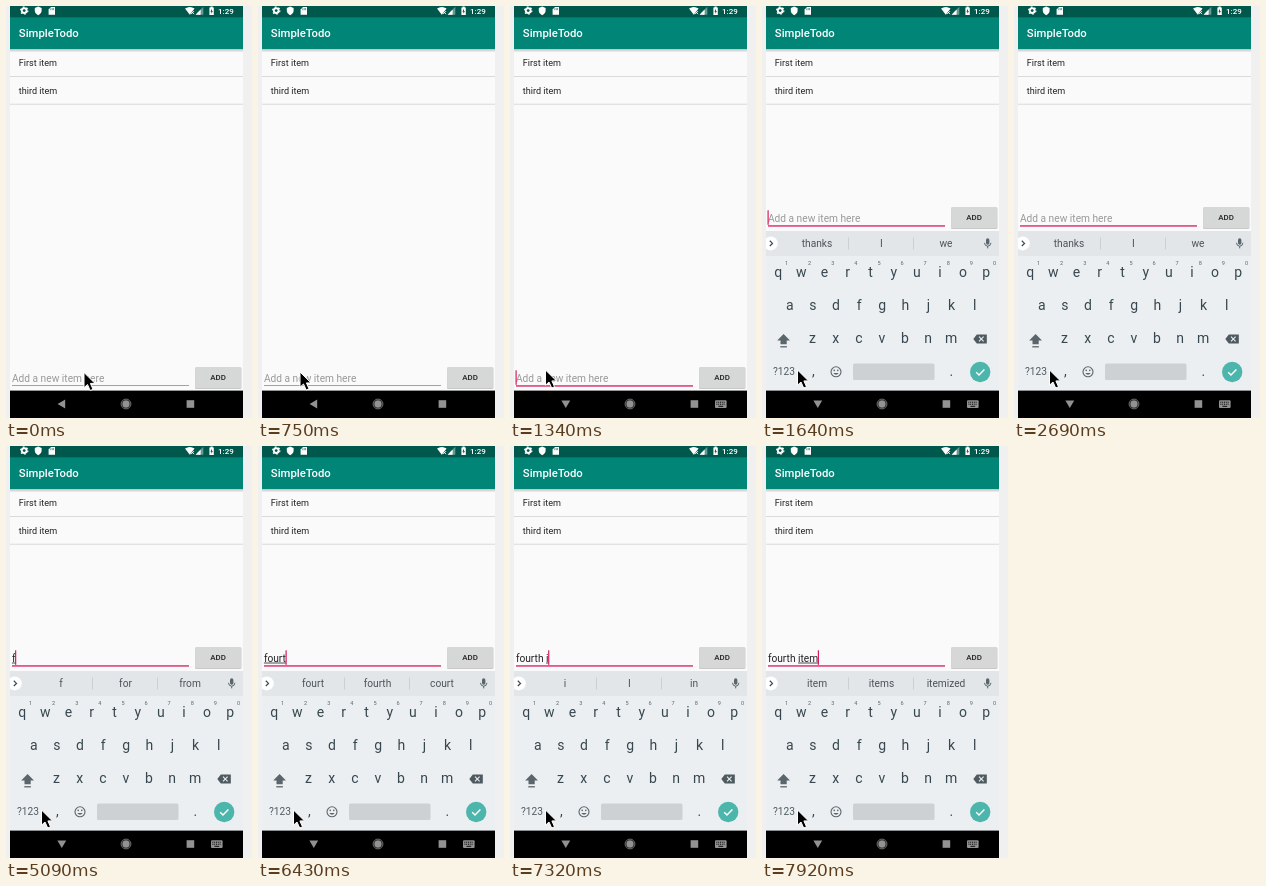
Animation of 246x412 px, one loop 8 s. Source, as an HTML page:

```html
<!DOCTYPE html>
<html lang="en">
<head>
<meta charset="utf-8">
<title>SimpleTodo</title>
<style>
  html, body { margin: 0; width: 100%; height: 100%; overflow: hidden; background: #f0f0f0; }
  svg { display: block; width: 100%; height: 100%; }
  text { font-family: Roboto, "Noto Sans", sans-serif; white-space: pre; }
  .item { font-size: 9.07px; fill: #222; }
  .field { font-size: 10.2px; fill: #222; }
  .hint { font-size: 10.2px; fill: #999; }
  .word { font-size: 10.2px; fill: #4c5359; text-anchor: middle; }
  .key { font-size: 14px; fill: #37474f; text-anchor: middle; }
  .digit { font-size: 5.6px; fill: #5b666c; text-anchor: middle; }
  .small { font-size: 10.2px; fill: #4f5b61; text-anchor: middle; }
</style>
</head>
<body>
<svg viewBox="0 0 246 412" preserveAspectRatio="none">
  <defs>
    <linearGradient id="shade" x2="0" y2="1">
      <stop offset="0" stop-color="#000" stop-opacity=".24"/>
      <stop offset="1" stop-color="#000" stop-opacity="0"/>
    </linearGradient>
    <clipPath id="screen"><rect x="4" y="0" width="233" height="385"/></clipPath>
  </defs>
  <rect width="246" height="412" fill="#f0f0f0"/>
  <rect x="4" width="233" height="412" fill="#fafafa"/>

  <!-- list -->
  <rect x="4" y="43" width="233" height="3.5" fill="url(#shade)"/>
  <path d="M4 70.5H237M4 98.2H237" stroke="#dadada"/>
  <text class="item" x="12.8" y="60">First item</text>
  <text class="item" x="12.8" y="87.8">third item</text>

  <!-- app bar and status bar -->
  <rect x="4" y="11" width="233" height="32" fill="#008577"/>
  <rect x="4" width="233" height="11.3" fill="#00574b"/>
  <text x="12.8" y="31.2" font-size="11.34" font-weight="500" fill="#fff">SimpleTodo</text>
  <g fill="#fff">
    <circle cx="18.2" cy="4.6" r="2.4" fill="none" stroke="#fff" stroke-width="1.9"/>
    <circle cx="18.2" cy="4.6" r="3.7" fill="none" stroke="#fff" stroke-width="1.1" stroke-dasharray="1.7 2.175"/>
    <path d="M32.2 .6L35.6 2V4.8Q35.4 7.8 32.2 9.2Q29 7.8 28.8 4.8V2Z"/>
    <path d="M45 1H49V8.8H42.6V3.5Z"/>
    <path d="M44.7 2.4V4.2M46.2 2V4.2M47.6 2V4.2" stroke="#00574b" stroke-width=".6"/>
    <path d="M179 2.6Q183.8 -.8 188.6 2.6L183.8 8.8Z"/>
    <path d="M185 5.1l3 3m0-3l-3 3" stroke="#fff" stroke-width=".9"/>
    <path d="M197.3 .8V8.8H189.6Z" fill-opacity=".4"/>
    <path d="M194.6 3.6V8.8H189.6Z"/>
    <path d="M203.4 1.5H204.5V.6H206.7V1.5H207.8V9H203.4Z"/>
    <path d="M206 2.7L204.4 5.7H205.4V7.8L206.9 4.9H206Z" fill="#00574b"/>
    <text x="212" y="7.7" font-size="8" font-weight="500">1:29</text>
  </g>

  <!-- entry row -->
  <g id="row">
    <rect x="6" y="379" width="177" height="1" id="rule"/>
    <text class="hint" id="hint" x="5.9" y="375.5">Add a new item here</text>
    <text class="field" id="typed" x="5.9" y="375.5"></text>
    <rect id="under" y="376.6" height=".8" fill="#222"/>
    <rect id="caret" y="364.3" width="1.2" height="14.5" fill="#d81b60"/>
    <rect x="189" y="361.8" width="46.4" height="21.2" rx="1.3" fill="#000" opacity=".2"/>
    <rect x="189.2" y="360.9" width="46" height="21" rx="1.2" fill="#d6d7d7"/>
    <text x="212" y="374.2" font-size="7.94" font-weight="500" fill="#222" text-anchor="middle">ADD</text>
  </g>

  <!-- keyboard -->
  <g clip-path="url(#screen)">
    <g id="board">
      <rect x="4" y="225" width="233" height="160" fill="#eceff1"/>
      <rect x="4" y="225" width="233" height="25" fill="#e2e6e9"/>
      <circle cx="8.8" cy="237.4" r="7" fill="#fff"/>
      <path d="M7.8 234.8L10.5 237.4L7.8 240" fill="none" stroke="#37474f" stroke-width="1.2"/>
      <path d="M86.5 231.5V243.5M151.5 231.5V243.5" stroke="#c9ced1" stroke-width=".9"/>
      <g id="words">
        <text class="word" x="55" y="241"></text>
        <text class="word" x="119.5" y="241"></text>
        <text class="word" x="184" y="241"></text>
      </g>
      <rect x="224" y="232.3" width="3.4" height="6.4" rx="1.7" fill="#5b666c"/>
      <path d="M222.5 236.8Q222.7 240.2 225.7 240.2T228.9 236.8M225.7 240.2V242.4" fill="none" stroke="#5b666c" stroke-width="1"/>
      <g id="keys"></g>
      <path d="M21.6 328L28 334.6H24.7V338.2H18.5V334.6H15.2Z" fill="#5b666c"/>
      <path d="M18.3 340.8H24.9" stroke="#5b666c" stroke-width="1.3"/>
      <path d="M211.3 333L214.8 328.4H224.8V337.6H214.8Z" fill="#4d5a60"/>
      <path d="M217 330.7l4.6 4.6m0-4.6l-4.6 4.6" stroke="#eceff1" stroke-width="1.1"/>
      <text class="small" x="22" y="369.4">?123</text>
      <text class="key" x="51.3" y="370">,</text>
      <circle cx="74" cy="365.8" r="5" fill="none" stroke="#5b666c" stroke-width="1.1"/>
      <path d="M71.3 367.1Q74 370.6 76.7 367.1Z" fill="#5b666c"/>
      <circle cx="72.2" cy="364.4" r=".8" fill="#5b666c"/>
      <circle cx="75.8" cy="364.4" r=".8" fill="#5b666c"/>
      <rect x="91" y="357.4" width="81.5" height="16.6" rx="1.5" fill="#cdd1d4"/>
      <text class="key" x="189.3" y="370">.</text>
      <circle cx="218.2" cy="366" r="10.2" fill="#4db6ac"/>
      <path d="M214.2 366.2L217 369L222.4 363.4" fill="none" stroke="#fff" stroke-width="1.4"/>
    </g>
  </g>

  <!-- navigation bar -->
  <rect x="4" y="384.6" width="233" height="27.4" fill="#000"/>
  <g fill="#929292">
    <path id="back" d="M51.6 398L59.2 393.6V402.4Z"/>
    <circle cx="120" cy="398" r="3.7"/>
    <circle cx="120" cy="398" r="4.9" fill="none" stroke="#929292" stroke-width=".8"/>
    <rect x="180.6" y="394.2" width="7.6" height="7.6"/>
    <g id="switch">
      <rect x="205" y="394.3" width="11.6" height="7.6" rx="1"/>
      <path d="M206.4 396.2H215.4M206.4 398.2H215.4" stroke="#000" stroke-width="1" stroke-dasharray="1 .8"/>
      <path d="M208.4 400.3H213.2" stroke="#000" stroke-width=".9"/>
    </g>
  </g>

  <path id="mouse" d="M0 0V15.2L3.5 12L6.2 18L9 16.8L6.4 10.9H11Z" fill="#000" stroke="#fff" stroke-width="1"/>
</svg>
<script>
  const LOOP = 8000;
  const $ = id => document.getElementById(id);
  const at = (steps, t) => steps.reduce((last, s) => s[0] <= t ? s : last);

  // [ms, x, y]
  const mouse = [[0, 78, 366.5], [300, 73, 369], [450, 63, 369.5], [600, 52, 368],
    [750, 42, 366], [890, 37, 364.5], [1040, 35.5, 364]];
  // [ms, keyboard offset]
  const slide = [[0, 160], [1490, 28], [1640, 0]];
  // [ms, caret visible]
  const blink = [[0, 0], [1040, 1], [1790, 0], [2240, 1], [2690, 0], [3290, 1],
    [3740, 0], [4190, 1], [4790, 0], [5090, 1]];
  // [ms, finished text, word being typed]
  const typing = [[0, "", ""], [5090, "", "f"], [5530, "", "fo"], [5980, "", "fou"],
    [6130, "", "four"], [6430, "", "fourt"], [6570, "", "fourth"], [6870, "fourth ", ""],
    [7320, "fourth ", "i"], [7470, "fourth ", "it"], [7620, "fourth ", "ite"],
    [7770, "fourth ", "item"]];
  // [ms, three suggestions]
  const hints = [[0, "thanks", "I", "we"], [5090, "f", "for", "from"], [5680, "fo", "for", "go"],
    [5980, "fou", "for", "four"], [6130, "four", "fourth", "hour"],
    [6430, "fourt", "fourth", "court"], [6570, "fourth", "forth", "fourths"],
    [6870, "of", "and", "time"], [7320, "i", "I", "in"], [7470, "it", "its", "item"],
    [7620, "ite", "item", "items"], [7770, "item", "items", "itemized"]];

  function addText(cls, x, y, str) {
    const el = document.createElementNS("http://www.w3.org/2000/svg", "text");
    el.setAttribute("class", cls);
    el.setAttribute("x", x);
    el.setAttribute("y", y);
    el.textContent = str;
    $("keys").append(el);
  }

  [["qwertyuiop", 16.2, 271], ["asdfghjkl", 27.8, 304], ["zxcvbnm", 50.6, 337.2]]
    .forEach(([row, x, y], r) => [...row].forEach((c, i) => {
      const cx = x + i * 23.1;
      addText("key", cx, y, c);
      if (!r) addText("digit", cx + 8.4, 259, (i + 1) % 10);
    }));

  const set = (id, attrs) => {
    for (const k in attrs) $(id).setAttribute(k, attrs[k]);
  };
  const show = (id, on) => set(id, { visibility: on ? "visible" : "hidden" });

  function draw(t) {
    const [, mx, my] = at(mouse, t);
    set("mouse", { transform: `translate(${mx} ${my})` });

    const focus = t >= 1040, open = t >= 1340, shift = at(slide, t)[1];
    set("board", { transform: `translate(0 ${shift})` });
    show("board", shift < 160);
    set("row", { transform: `translate(0 ${shift < 160 ? -160 : 0})` });
    set("rule", { fill: focus ? "#d81b60" : "#999", y: focus ? 379.3 : 379, height: focus ? 1.3 : .9 });
    set("back", { d: open ? "M51.4 394.4H60.2L55.8 402Z" : "M51.6 398L59.2 393.6V402.4Z" });
    show("switch", open);

    const [, done, word] = at(typing, t), typed = $("typed");
    typed.textContent = done;
    const start = done ? typed.getComputedTextLength() : 0;
    typed.textContent = done + word;
    const end = done + word ? typed.getComputedTextLength() : 0;
    show("hint", !(done + word));
    set("under", { x: 5.9 + start, width: word ? end - start : 0 });
    set("caret", { x: 5.5 + end });
    show("caret", at(blink, t)[1]);

    const words = at(hints, t);
    [...$("words").children].forEach((el, i) => el.textContent = words[i + 1]);
  }

  const begin = performance.now();
  function tick() {
    draw((performance.now() - begin) % LOOP);
    requestAnimationFrame(tick);
  }
  tick();
</script>
</body>
</html>
```
